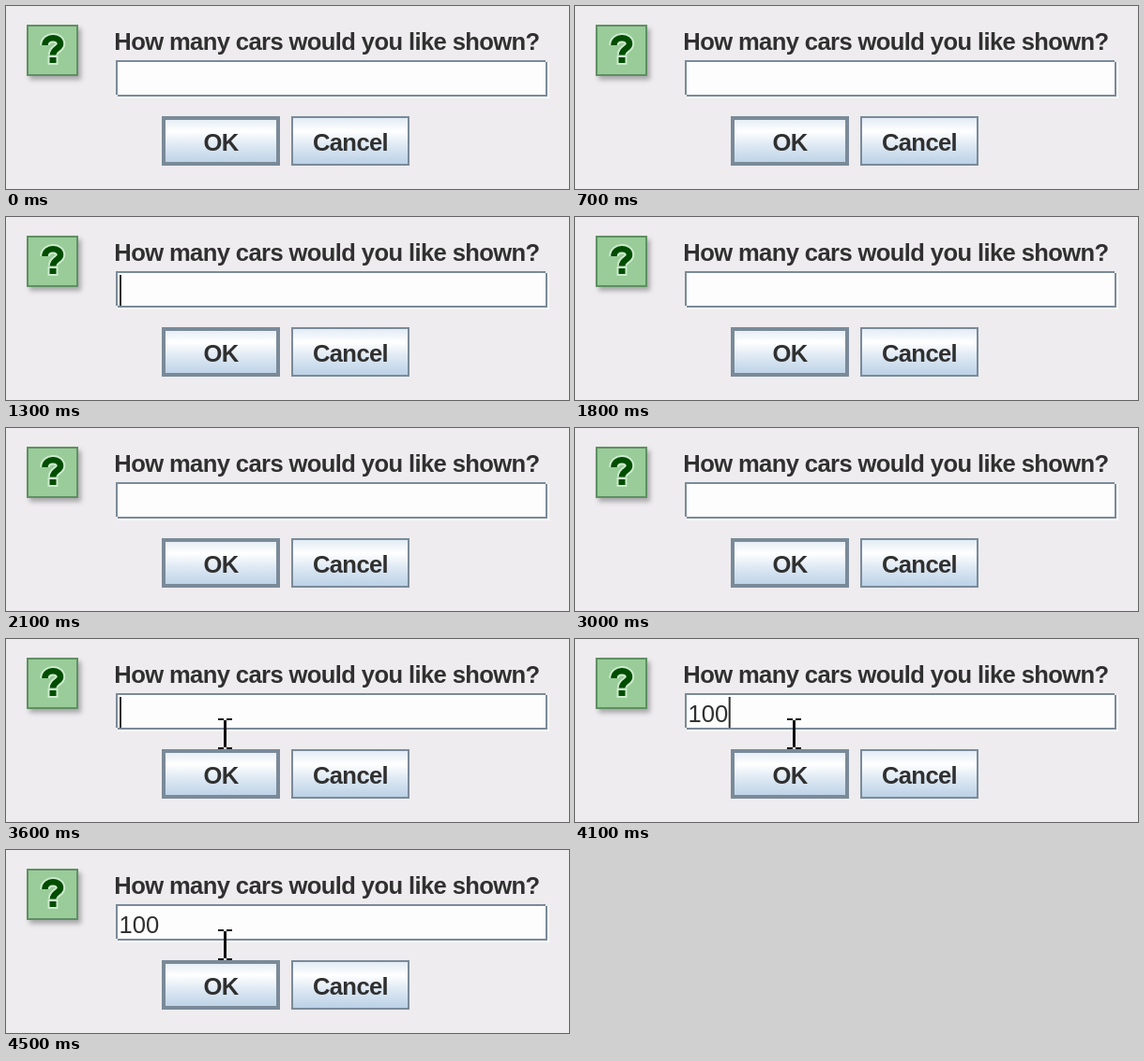
An HTML page with a canvas for the animation above (4600 ms loop, 600 by 196 pixels).

```html
<!DOCTYPE html>
<html lang="en">
<head>
<meta charset="utf-8">
<title>Input dialog</title>
<style>
html, body { margin: 0; width: 100%; height: 100%; overflow: hidden; background: #eeecee; }
/* slight softness of an enlarged dialog */
canvas { display: block; filter: blur(0.45px); }
</style>
</head>
<body>
<canvas id="stage" width="600" height="196"></canvas>
<script>
const ctx = document.getElementById('stage').getContext('2d');
const LOOP = 4600, BLINK = 500, BLINK_START = 200;
const POINTER_AT = 3200;
const KEYS = [3700, 3850, 4000];
const VALUE = '100';
const PAPER = '#eeecee', EDGE = '#7a8a99', INK = '#303030';
const SANS = '"Liberation Sans", Arial, sans-serif';

function rect(x, y, w, h, color) {
  ctx.fillStyle = color;
  ctx.fillRect(x, y, w, h);
}

function frame(x, y, w, h, line, color) {
  ctx.strokeStyle = color;
  ctx.lineWidth = line;
  ctx.strokeRect(x + line / 2, y + line / 2, w - line, h - line);
}

function text(str, x, y, weight = 'bold', align = 'left') {
  const bold = weight === 'bold';
  ctx.font = `${weight} 25.6px ${SANS}`;
  ctx.letterSpacing = bold ? '-0.62px' : '0px';
  ctx.textAlign = align;
  ctx.fillStyle = INK;
  ctx.fillText(str, x, y);
}

function icon() {
  ctx.save();
  ctx.shadowColor = 'rgba(70, 70, 75, 0.42)';
  ctx.shadowBlur = 5;
  ctx.shadowOffsetX = 3;
  ctx.shadowOffsetY = 4;
  rect(22, 20, 55, 55, '#99cc99');
  ctx.restore();
  frame(22, 20, 55, 55, 2, '#5f8f63');

  // halo first, then the dark strokes on top
  for (const [extra, color] of [[4, '#cdeacd'], [0, '#004d00']]) {
    ctx.strokeStyle = color;
    ctx.lineWidth = 6.5 + extra;
    ctx.beginPath();
    ctx.moveTo(41.5, 42);
    ctx.bezierCurveTo(41.5, 32, 58, 32, 58, 40.5);
    ctx.bezierCurveTo(58, 46, 50, 45.5, 50, 52.5);
    ctx.stroke();
    rect(46.5 - extra / 2, 55 - extra / 2, 7 + extra, 6 + extra, color);
  }
}

function button(label, x, line) {
  const y = 118, w = 126, h = 53;
  const fill = ctx.createLinearGradient(0, y, 0, y + h);
  fill.addColorStop(0, '#dde8f3');
  fill.addColorStop(0.3, '#ffffff');
  fill.addColorStop(0.6, '#dde8f3');
  fill.addColorStop(1, '#b8cfe5');
  rect(x, y, w, h, fill);
  frame(x, y, w, h, line, EDGE);
  text(label, x + w / 2, 154.5, 'bold', 'center');
}

function field() {
  rect(119, 60, 460, 39, '#fbfbfc');
  rect(117, 58, 460, 39, '#fdfdfe');
  frame(117, 58, 460, 39, 2, EDGE);
  rect(117, 95, 2, 2, PAPER);
  rect(575, 58, 2, 2, PAPER);
}

function pointer() {
  const c = '#111111';
  rect(226, 85, 6, 2, c);
  rect(235, 85, 6, 2, c);
  rect(232, 87, 3, 29, c);
  rect(226, 116, 6, 2, c);
  rect(235, 116, 6, 2, c);
}

function caretOn(t) {
  if (t < KEYS[0]) return t >= BLINK_START && Math.floor((t - BLINK_START) / BLINK) % 2 === 0;
  return t < KEYS[KEYS.length - 1] + BLINK;
}

function draw(t) {
  rect(0, 0, 600, 196, PAPER);
  icon();
  text('How many cars would you like shown?', 115.3, 46.5);
  field();
  button('OK', 166, 4);
  button('Cancel', 304, 2);

  const typed = VALUE.slice(0, KEYS.filter(k => t >= k).length);
  text(typed, 120.5, 89, 'normal');
  if (caretOn(t)) rect(121 + ctx.measureText(typed).width, 62, 2, 33, INK);
  if (t >= POINTER_AT) pointer();
}

const start = performance.now();
function tick() {
  draw((performance.now() - start) % LOOP);
  requestAnimationFrame(tick);
}
tick();
</script>
</body>
</html>
```
